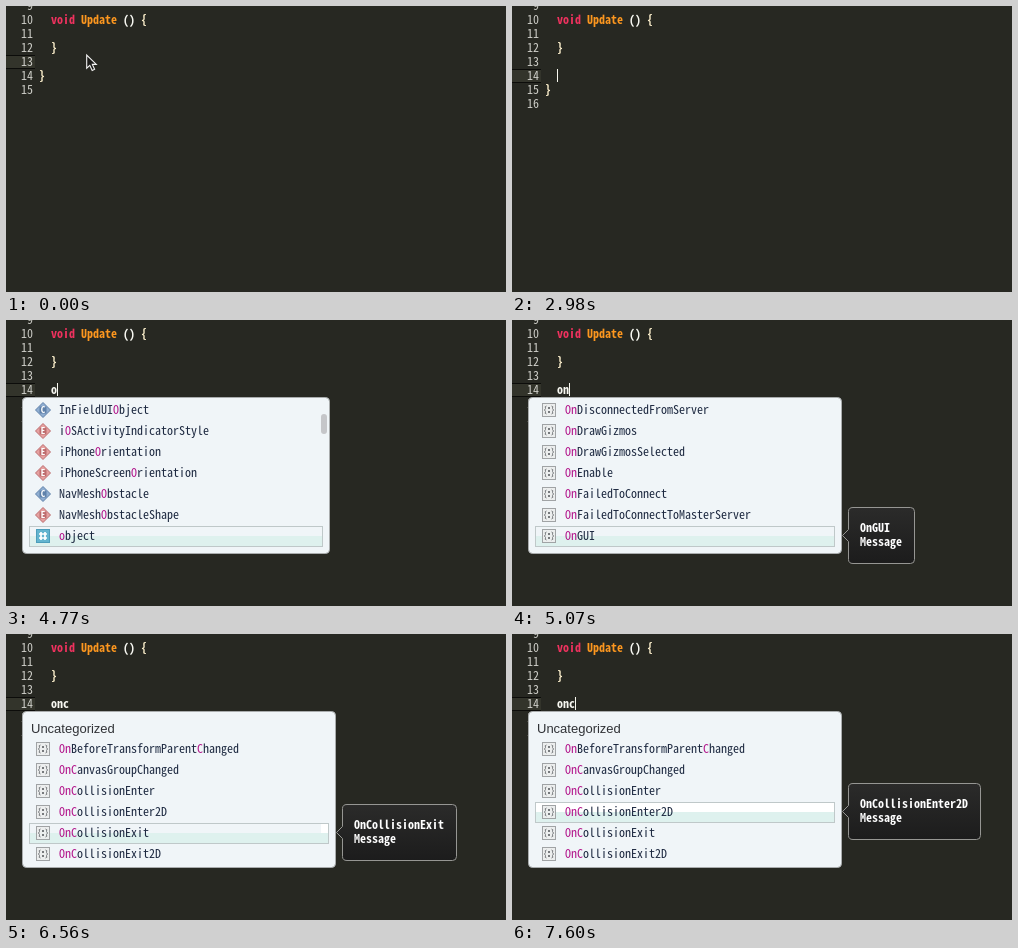
Recreate the animation shown at these times as an HTML page. Size 500 px wide and 286 px high, loop 8 s.

```html
<!DOCTYPE html>
<html lang="en">
<head>
<meta charset="utf-8">
<title>Code completion</title>
<style>
  html, body { margin: 0; width: 100%; height: 100%; overflow: hidden; background: #272822; }
  svg { display: block; width: 500px; height: 286px; }
  text { white-space: pre; font-family: "Noto Sans Mono CJK JP", "Noto Sans Mono CJK SC", "Noto Sans Mono", monospace; }
  .bold { font-weight: 700; }
  .head { font: 13px "Liberation Sans", Arial, sans-serif; }
</style>
</head>
<body>
<svg id="stage" viewBox="0 0 500 286"></svg>
<script>
const LOOP = 8000, CELL = 6, LINE = 14, ROW = 21;
const stage = document.getElementById('stage');

// Font size at which one character is exactly one cell wide
const pen = document.createElement('canvas').getContext('2d');
pen.font = '100px "Noto Sans Mono CJK JP", "Noto Sans Mono CJK SC", "Noto Sans Mono", monospace';
const SIZE = 100 * CELL / pen.measureText('M').width;

const rect = (x, y, w, h, fill, more = '') =>
  `<rect x="${x}" y="${y}" width="${w}" height="${h}" fill="${fill}" ${more}/>`;
const path = (d, fill, more = '') => `<path d="${d}" fill="${fill}" ${more}/>`;
const text = (x, y, body, fill, cls = '', size = SIZE) =>
  `<text x="${x}" y="${y}" fill="${fill}" class="${cls}" font-size="${size}">${body}</text>`;
const tint = (fill, s) => `<tspan fill="${fill}">${s}</tspan>`;

const lineTop = n => 7 + (n - 10) * LINE;
const code = (n, x, body, fill = '#fbeecb') => text(x, lineTop(n) + 11, body, fill, 'bold');

const LISTS = {
  types: {
    query: 'o', top: 80, right: 324,
    items: ['InFieldUIObject', 'iOSActivityIndicatorStyle', 'iPhoneOrientation',
      'iPhoneScreenOrientation', 'NavMeshObstacle', 'NavMeshObstacleShape', 'object'],
    icons: 'CEEECE#'
  },
  messages: {
    query: 'on', top: 80, right: 330,
    items: ['OnDisconnectedFromServer', 'OnDrawGizmos', 'OnDrawGizmosSelected', 'OnEnable',
      'OnFailedToConnect', 'OnFailedToConnectToMasterServer', 'OnGUI']
  },
  collisions: {
    query: 'onc', top: 105, right: 330, head: 'Uncategorized',
    items: ['OnBeforeTransformParentChanged', 'OnCanvasGroupChanged', 'OnCollisionEnter',
      'OnCollisionEnter2D', 'OnCollisionExit', 'OnCollisionExit2D']
  }
};

// Each step changes part of the state and holds until the next one
const STEPS = [
  [0, { line: 13, last: 15, typed: '', caret: 0, mouse: ['arrow', 80, 48], list: '', pick: 0, tip: 0, thumb: null, shine: 0 }],
  [300, { mouse: ['beam', 85, 48] }],
  [440, { mouse: ['beam', 73, 53] }],
  [590, { mouse: ['beam', 71, 54] }],
  [1040, { mouse: ['beam', 68, 48] }],
  [1190, { caret: 1 }],
  [1930, { caret: 0 }],
  [2680, { caret: 1 }],
  [2980, { line: 14, last: 16, mouse: null }],
  [3880, { caret: 0 }],
  [4630, { caret: 1 }],
  [4770, { typed: 'o', list: 'types', pick: 6, thumb: [94, 20, '#c5c6c9'] }],
  [4920, { typed: 'on', list: 'messages', thumb: null }],
  [5070, { tip: 1 }],
  [5660, { typed: 'onc', list: 'collisions', pick: 4, tip: 0, thumb: [86, 35, '#797b7e'], shine: 1 }],
  [5810, { tip: 1 }],
  [5960, { thumb: [86, 35, '#b9bcbf'] }],
  [6110, { thumb: null }],
  [6560, { caret: 0 }],
  [7300, { caret: 1, tip: 0 }],
  [7450, { pick: 3, shine: 2 }],
  [7600, { tip: 1 }]
];

function editor(s) {
  const top = lineTop(s.line);
  let out = rect(0, top, 29, LINE, '#33342b') + rect(0, top, 29, 1, '#0c0c0a') + rect(0, top + 13, 29, 1, '#0c0c0a');
  for (let n = 9; n <= s.last; n++)
    out += text(27 - CELL * String(n).length, lineTop(n) + 11, n, '#cfcfc9');
  out += code(10, 45, `${tint('#f0325f', 'void')} ${tint('#fd971f', 'Update')} ${tint('#f8f8f2', '()')} {`);
  out += code(12, 45, '}') + code(s.last - 1, 33, '}');
  out += code(s.line, 45, s.typed, '#f8f8f2');
  if (s.caret) out += rect(45 + CELL * s.typed.length, top, 1, 13, '#f8f8f0');
  return out;
}

function mouse([kind, x, y]) {
  const at = d => `<g transform="translate(${x} ${y})">${d}</g>`;
  if (kind === 'arrow')
    return at(path('M.7 1V14.2L3.8 11.3L6.2 16.4L8.6 15.3L6.3 10.4H10.3Z', '#1c1c1a', 'stroke="#f4f4f4" stroke-width="1.1"'));
  const d = 'M-4 1Q0 1 0 4Q0 1 4 1M0 4V14M-4 17Q0 17 0 14Q0 17 4 17M-2 10H2';
  return at(path(d, 'none', 'stroke="#a5a5a1" stroke-width="2.4"') + path(d, 'none', 'stroke="#20201d"'));
}

// Colours the typed letters, preferring capitals
function matched(name, query) {
  const hits = new Set();
  let from = 0;
  for (const c of query) {
    let i = name.indexOf(c.toUpperCase(), from);
    if (i < 0) i = name.indexOf(c, from);
    if (i >= 0) { hits.add(i); from = i + 1; }
  }
  return [...name].map((c, i) => hits.has(i) ? tint('#b3178c', c) : c).join('');
}

function icon(kind, y) {
  if (kind === 'C' || kind === 'E') {
    const [fill, edge] = kind === 'C' ? ['#8fadd0', '#5f81aa'] : ['#e5a09f', '#bd6c6e'];
    return path(`M37 ${y - 7.5}L44.5 ${y}L37 ${y + 7.5}L29.5 ${y}Z`, fill, `stroke="${edge}"`) +
      rect(33.5, y - 3.5, 7, 7, edge, 'rx="1"') + text(34.7, y + 3, kind, '#fff', 'bold', SIZE * .75);
  }
  if (kind === '#')
    return rect(30.5, y - 6.5, 13, 13, '#63b4cf', 'stroke="#4c9dbb"') +
      path(`M35 ${y - 4}V${y + 4}M39 ${y - 4}V${y + 4}M33 ${y - 2}H41M33 ${y + 2}H41`, 'none', 'stroke="#fff" stroke-width="1.7"');
  return rect(30.5, y - 6.5, 13, 13, '#eceeee', 'stroke="#a0a3a5"') +
    path(`M34.5 ${y - 4}Q32.5 ${y - 4} 33.5 ${y - 1.5}L32.5 ${y}L33.5 ${y + 1.5}Q32.5 ${y + 4} 34.5 ${y + 4}` +
      `M39.5 ${y - 4}Q41.5 ${y - 4} 40.5 ${y - 1.5}L41.5 ${y}L40.5 ${y + 1.5}Q41.5 ${y + 4} 39.5 ${y + 4}`, 'none', 'stroke="#777a7d"') +
    rect(36, y - 3, 2, 2, '#777a7d') + rect(36, y + 1, 2, 2, '#777a7d');
}

function popup(s) {
  const l = LISTS[s.list], sel = l.top + ROW * s.pick, w = l.right - 30;
  let out = rect(16.5, 77.5, l.right - 17, 156, '#f0f5f8', 'rx="4" stroke="#a9acad"');
  if (l.head) out += text(25, 99, l.head, '#303236', 'head');
  out += rect(23, sel + 10, w, 11, '#def1ee');
  if (s.shine) {
    const x = s.shine === 2 ? 24 : 315;
    out += rect(x, sel + 1, l.right - 8 - x, 9, '#fff');
  }
  out += rect(23.5, sel + .5, w - 1, 20, 'none', 'stroke="#bfc8c9"');
  l.items.forEach((name, i) => {
    const y = l.top + ROW * i;
    out += icon(l.icons?.[i], y + 10) + text(53, y + 14, matched(name, l.query), '#1d2940');
  });
  if (s.thumb) out += rect(315, s.thumb[0], 6, s.thumb[1], s.thumb[2], 'rx="3"');
  if (s.tip) out += tooltip(l.items[s.pick], sel - 19);
  return out;
}

function tooltip(name, y) {
  const r = 336 + 25 + CELL * Math.max(name.length, 7) - .5, t = y + .5, b = y + 56.5, c = y + 28.5;
  const d = `M341 ${t}H${r - 4}Q${r} ${t} ${r} ${t + 4}V${b - 4}Q${r} ${b} ${r - 4} ${b}H341` +
    `Q336.5 ${b} 336.5 ${b - 4}V${c + 6}L330.5 ${c}L336.5 ${c - 6}V${t + 4}Q336.5 ${t} 341 ${t}Z`;
  return path(d, 'url(#dark)', 'stroke="#969693"') +
    text(348, y + 25, name, '#fff', 'bold') + text(348, y + 39, 'Message', '#fff', 'bold');
}

const shade = '<defs><linearGradient id="dark" x1="0" y1="0" x2="0" y2="1">' +
  '<stop offset="0" stop-color="#2b2b2a"/><stop offset="1" stop-color="#1c1c1c"/></linearGradient></defs>';

function draw(s) {
  stage.innerHTML = shade + rect(0, 0, 500, 286, '#272822') + editor(s) +
    (s.mouse ? mouse(s.mouse) : '') + (s.list ? popup(s) : '');
}

const start = performance.now();
let shown = -1;
function tick() {
  const t = (performance.now() - start) % LOOP;
  const count = STEPS.filter(([at]) => at <= t).length;
  if (count !== shown) {
    shown = count;
    draw(Object.assign({}, ...STEPS.slice(0, count).map(step => step[1])));
  }
  requestAnimationFrame(tick);
}
tick();
</script>
</body>
</html>
```
